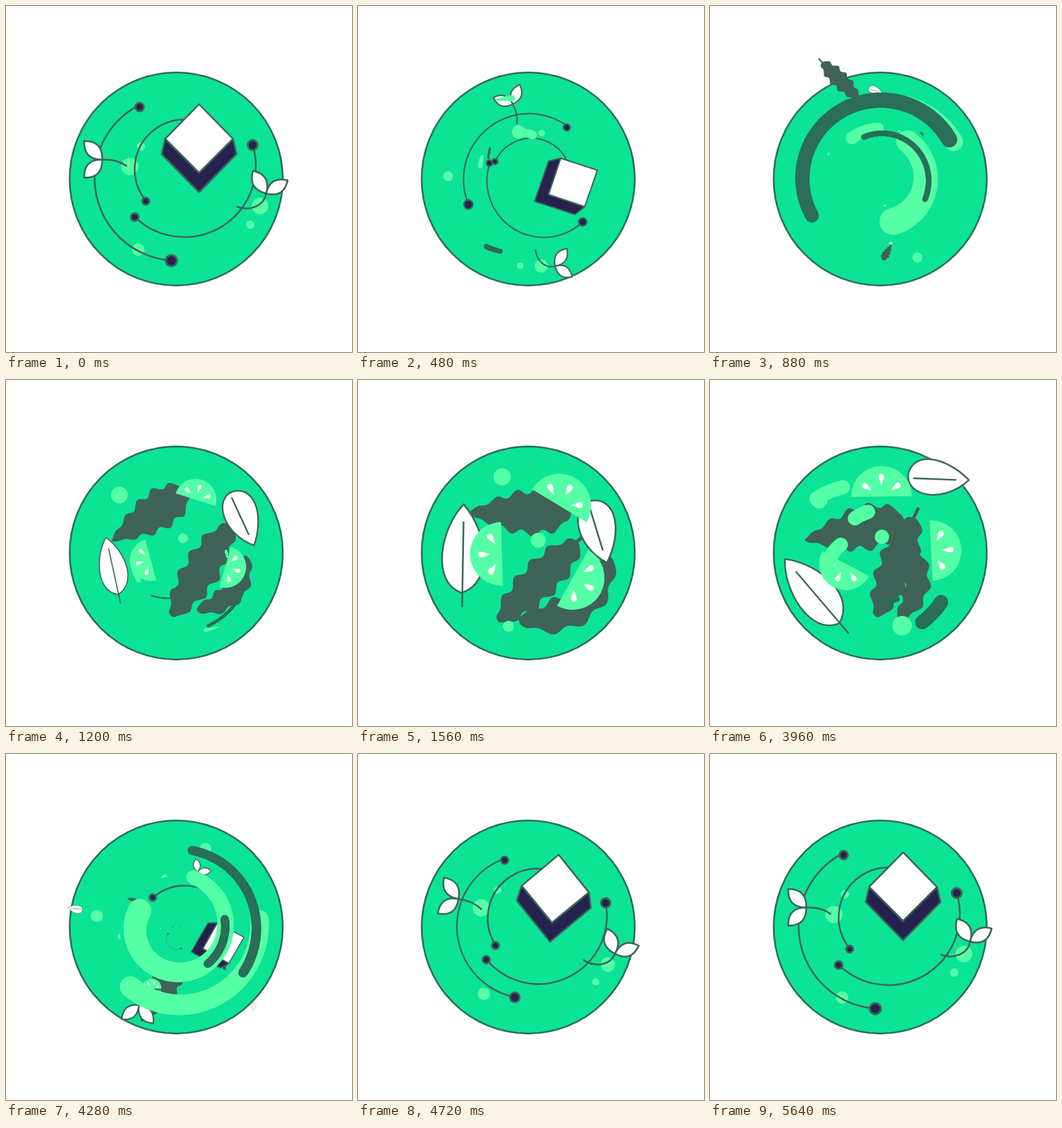
Animation of 500x500 px, one loop 6.76 s. Source, as an HTML page with a canvas:

```html
<!DOCTYPE html>
<html lang="en">
<head>
<meta charset="utf-8">
<title>Salad and circuits</title>
<style>
  html, body { margin: 0; width: 100%; height: 100%; overflow: hidden; background: #fff; }
  canvas { display: block; width: 500px; height: 500px; }
</style>
</head>
<body>
<canvas width="500" height="500"></canvas>
<script>
const ctx = document.querySelector('canvas').getContext('2d');
const LOOP = 6760, START = 40, BACK = 3640, CX = 246, CY = 250, TAU = Math.PI * 2, DEG = TAU / 360;
const GREEN = '#0be395', LIGHT = '#55ffa5', LINE = '#3f6358', DARK = '#2b6f59', NAVY = '#262250', WHITE = '#fff';
const clamp = (x, lo = 0, hi = 1) => Math.min(hi, Math.max(lo, x));
const lerp = (a, b, k) => a + (b - a) * k;

// --- Shapes ---
function paint(path, fill, stroke, width = 2.5) {
  if (fill) { ctx.fillStyle = fill; ctx.fill(path); }
  if (stroke) { ctx.strokeStyle = stroke; ctx.lineWidth = width; ctx.stroke(path); }
}

function disc(x, y, r, fill, stroke, width) {
  const path = new Path2D();
  path.arc(x, y, r, 0, TAU);
  paint(path, fill, stroke, width);
}

// A rippled leaf around a spine that bows sideways; peak moves its widest point
function lettuce([ax, ay], [bx, by], { bend = 0, half, lobes, peak = 1, stem }) {
  const dx = bx - ax, dy = by - ay, len = Math.hypot(dx, dy);
  const edge = (u, side) => {
    const along = u * len, out = half * Math.sqrt(Math.sin(Math.PI * u ** peak));
    const ripple = 4.5 * Math.sin(TAU * lobes * u + side) * Math.min(1, out / half * 1.2);
    const slope = Math.atan2(bend * 2 * (1 - 2 * u), len);
    const h = side * (out + ripple);
    const x = along - h * Math.sin(slope), y = 2 * bend * u * (1 - u) + h * Math.cos(slope);
    return [ax + (x * dx - y * dy) / len, ay + (x * dy + y * dx) / len];
  };
  const body = new Path2D(), n = 80;
  for (let i = 0; i <= n; i++) body.lineTo(...edge(i / n, 1));
  for (let i = n; i >= 0; i--) body.lineTo(...edge(i / n, -1));
  return () => {
    paint(body, LINE);
    if (stem) paint(new Path2D(stem), null, LINE, 5);
  };
}

const leaf = (outline, rib) => () => {
  paint(new Path2D(outline), WHITE, LINE);
  paint(new Path2D(rib), null, LINE);
};

const seed = new Path2D('M-17,0 C-24,-2 -28,-4.5 -31,-4.2 C-36,-3.5 -36,3.5 -31,4.2 C-28,4.5 -24,2 -17,0Z');
const lime = (x, y, turn) => () => {
  ctx.translate(x, y);
  ctx.rotate(turn * DEG);
  const half = new Path2D();
  half.arc(0, 0, 46.5, TAU / 4, TAU * 3 / 4);
  paint(half, LIGHT);
  ctx.rotate(-57 * DEG);
  for (let i = 0; i < 3; i++) {
    paint(seed, WHITE);
    ctx.rotate(57 * DEG);
  }
};

const circuit = (x, y, r, from, to, ...nodes) => () => {
  const path = new Path2D();
  path.arc(x, y, r, from * DEG, to * DEG);
  paint(path, null, LINE);
  nodes.forEach(n => disc(...n, NAVY, LINE, 3));
};

function petal(x, y, tx, ty) {
  const mx = (x + tx) / 2, my = (y + ty) / 2, k = 0.52, dx = (ty - y) * k, dy = (x - tx) * k;
  paint(new Path2D(`M${x},${y} Q${mx + dx},${my + dy} ${tx},${ty} Q${mx - dx},${my - dy} ${x},${y}Z`), WHITE, LINE);
}

const sprout = (x, y, stem, ...tips) => () => {
  paint(new Path2D(`M${x},${y} ${stem}`), null, LINE);
  tips.forEach(tip => petal(x, y, ...tip));
};

function cube() {
  paint(new Path2D('M230,192 L225,214 L279,269 L333,214 L328,192 L279,241Z'), NAVY, LINE);
  paint(new Path2D('M279,142 L328,192 L279,241 L230,192Z'), WHITE, LINE);
}

// --- Parts ---
// Every part circles the centre. "enter" gives how far it still is from rest at the
// middle of a swap, "exit" how far it has gone by then; angles follow the swap's direction.
function part(x, y, draw, enter, exit) {
  return {
    x, y, draw,
    enter: { orbit: 100, drift: 0, size: .05, lag: 0, ...enter },
    exit: { orbit: 134, drift: 0, dip: 0, twist: 0, size: .1, fade: 4, ...exit }
  };
}
const dot = (x, y, r, enter, exit) => part(x, y, () => disc(x, y, r, LIGHT), enter, exit);
const wedge = (x, y, turn, exit) => part(x, y, lime(x, y, turn), {}, exit);

const salad = [
  part(240, 193, lettuce([162, 187], [312, 196], { half: 31, lobes: 5, peak: 1.6 }),
    { orbit: 180, drift: .87, turn: 245, size: .17 },
    { orbit: 160, drift: .7, dip: .35, twist: -100, size: .65 }),
  part(300, 320, lettuce([365, 258], [228, 346], { bend: -64, half: 25, lobes: 4.5 }),
    {}, { orbit: 20, dip: .3, twist: 190, size: .18, fade: 1.5 }),
  part(325, 228, lettuce([315, 235], [182, 330], { half: 26, lobes: 5, peak: .9, stem: 'M304,241 L327,227' }),
    { orbit: 102, drift: 1.37, turn: 92, size: .45, lag: -8 }),
  part(152, 250, leaf('M155,176 C120,210 103,288 148,305 C195,291 190,220 155,176Z', 'M154,202 L148,325'),
    {}, { drift: .7, twist: 38 }),
  part(345, 178, leaf('M379,261 C392,212 373,165 338,178 C309,192 327,246 379,261Z', 'M338,188 L369,244'),
    { orbit: 61, drift: .09, turn: 58, size: .21, lag: 13 },
    { orbit: 134, drift: .13, twist: 100, size: .23 }),
  wedge(293, 183, 123),
  wedge(309, 288, -149),
  wedge(208, 250, 0, { orbit: 68, drift: 1.5, twist: 180, size: .3, fade: 2 }),
  dot(215, 138, 12.5, { orbit: 191, drift: .08, size: .58 }),
  dot(261, 232, 11),
  dot(214, 355, 15, { size: .0006 })
];

const tech = [
  dot(179, 232, 12.5, { orbit: 96, drift: .75, size: .66 }),
  dot(195, 203, 6),
  dot(191, 352, 9, { orbit: 70, size: .98 }),
  dot(367, 289, 12),
  dot(353, 316, 6),
  part(247, 249, circuit(247, 249, 119, 94, 242, [193, 146, 6], [239, 368, 8])),
  part(258, 231, circuit(258, 231, 103, -17, 134, [186, 305, 5.5], [356.5, 201, 7]),
    { orbit: 148, drift: -.2, turn: 80, size: .14 }),
  part(202, 282, circuit(258, 236, 72, 140, 270, [202, 282, 5]), { orbit: 88, size: .95 }),
  part(279, 205, cube, { orbit: 77, drift: .17, turn: 75, size: .62 }),
  part(139, 222, sprout(139, 222, 'Q160,221 174,231', [113, 195], [113, 248]),
    { orbit: 97, drift: -.23, turn: 130, size: .52 }),
  part(376, 271, sprout(376, 271, 'C373,289 352,297 334,290', [357, 238], [407, 252]),
    { orbit: 107, drift: -.05, turn: 173, size: .88 })
];

// --- Motion ---
function place({ x, y, draw }, orbit, ratio, turn, size) {
  if (size < .015) return;
  ctx.save();
  ctx.translate(CX, CY);
  ctx.rotate(orbit * DEG);
  ctx.translate((x - CX) * ratio, (y - CY) * ratio);
  ctx.rotate((turn - orbit) * DEG);
  ctx.scale(size, size);
  ctx.translate(-x, -y);
  draw();
  ctx.restore();
}

// Turns decay exponentially while the size follows a logistic curve
function flyIn(item, since, dir) {
  if (since < -300) return;
  const { orbit, drift, turn = orbit, size, lag } = item.enter;
  const k = Math.min(3, Math.exp(-since / 170));
  const u = clamp((since - 680) / 900), late = 1 - u * u * (3 - 2 * u);
  place(item, -dir * orbit * k, 1 + drift * Math.min(k, 1.3), -dir * turn * k + lag * late,
    1 / (1 + (1 / size - 1) * Math.exp(-since / 90)));
}

// Parts speed up from rest, shrink late and vanish soon after the middle
function flyOut(item, since, dir) {
  const v = since / 640;
  if (v > 1.3) return;
  const { orbit, drift, dip, twist, size, fade } = item.exit;
  const angle = dir * orbit * v * v;
  place(item, angle, 1 + drift * v * v - dip * Math.sin(Math.PI * Math.min(v, 1)), angle + dir * twist * v * v,
    Math.max(0, 1 - (1 - size) * v ** fade) * (1 - clamp((v - 1) / .3)));
}

// --- Swirls: tail and head angles, radii and widths at the middle of a swap ---
const swirl = (color, tail, head, radius, width, start) => ({ color, tail, head, radius, width, start });
const forward = [
  swirl(LIGHT, -72, -27, [123, 119], [6, 27]),
  swirl(LIGHT, -55, 73, [67, 64], [32, 39]),
  swirl(LIGHT, 235, 268, [72, 74], [18, 14]),
  swirl(DARK, 151, 330, [112, 115], [20, 23]),
  swirl(DARK, 248, 384, [65, 71], [8, 8])
];
const backward = [
  swirl(LIGHT, -232, -365, [109, 121], [31, 26], -119),
  swirl(LIGHT, 205, -71, [58, 76], [34, 20], 192),
  swirl(LIGHT, -200, -290, [62, 62], [14, 14], -106),
  swirl(DARK, 35, -78, [117, 113], [14, 13], 59),
  swirl(DARK, 50, -9, [70, 71], [12, 12])
];

function drawSwirl({ color, tail, head, radius, width, start }, since, dir, times) {
  if (since <= times[0] || since >= times[3]) return;
  const from = start ?? tail - dir * 40, end = head + dir * 120;
  const early = start === undefined ? width.map(w => w * .6) : [20, 20];
  const keys = [[from, from, 0, 0], [from, from + dir * 20, ...early], [tail, head, ...width], [end, end, 0, 0]];
  const i = times.findLastIndex(time => since >= time);
  const k = (since - times[i]) / (times[i + 1] - times[i]);
  const [a, b, wa, wb] = keys[i].map((x, j) => lerp(x, keys[i + 1][j], k));
  const point = u => {
    const angle = lerp(a, b, u) * DEG, r = lerp(...radius, u);
    return [CX + r * Math.cos(angle), CY + r * Math.sin(angle)];
  };
  for (let j = 0, n = 80; j < n; j++) {
    const path = new Path2D();
    path.moveTo(...point(j / n));
    path.lineTo(...point((j + 1) / n));
    paint(path, null, color, Math.max(.1, lerp(wa, wb, j / n)));
  }
}

function draw(t) {
  if (t < START) t += LOOP;
  const toSalad = t < BACK, dir = toSalad ? 1 : -1;
  const since = t - (toSalad ? START : BACK);
  const times = toSalad ? [350, 520, 840, 1240] : [200, 320, 640, 1020];
  const arrive = item => flyIn(item, since - times[2], dir);
  const leave = item => flyOut(item, since, dir);

  ctx.fillStyle = WHITE;
  ctx.fillRect(0, 0, 500, 500);
  ctx.lineCap = ctx.lineJoin = 'round';
  disc(CX, CY, 154, GREEN, '#2f6b58', 2.5);
  salad.forEach(toSalad ? arrive : leave);
  tech.forEach(toSalad ? leave : arrive);
  (toSalad ? forward : backward).forEach(s => drawSwirl(s, since, dir, times));
}

const begin = performance.now();
function frame() {
  draw((performance.now() - begin) % LOOP);
  requestAnimationFrame(frame);
}
frame();
</script>
</body>
</html>
```
